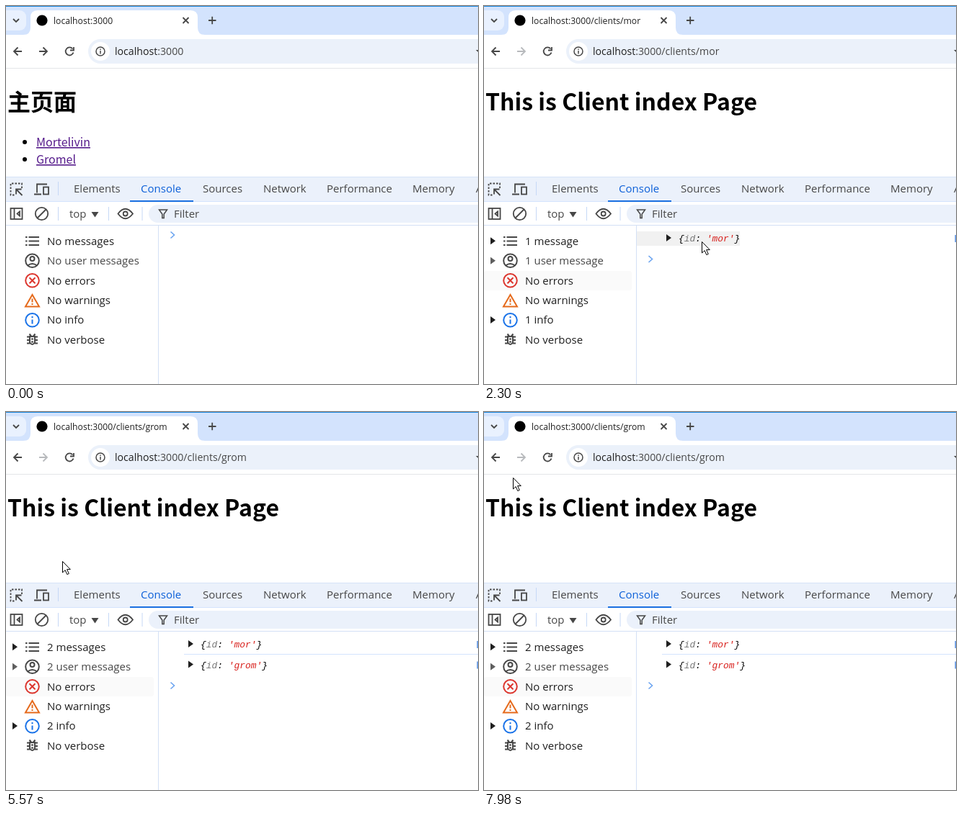
An HTML page that plays this animation: 655 px wide and 525 px high, repeating every 8 s.

```html
<!DOCTYPE html>
<html lang="zh">
<head>
<meta charset="utf-8">
<title>localhost:3000</title>
<style>
html, body { margin: 0; width: 100%; height: 100%; overflow: hidden; background: #fff; }
svg { display: block; }
text { white-space: pre; }
.ui { font: 15px "Open Sans", "Noto Sans", sans-serif; fill: #1f1f1f; }
.small { font-size: 12.2px; }
.url { font-size: 14.15px; }
.page { font: 16px "Noto Sans CJK SC", "Noto Sans CJK", "Noto Sans", sans-serif; }
.title { font-weight: 700; font-size: 32px; }
.link { fill: #551a8b; text-decoration: underline; }
.log { font: italic 12.9px "Liberation Mono", monospace; }
.soft { fill: #474747; }
.line { fill: none; stroke: #474747; stroke-width: 1.8; }
</style>
</head>
<body>
<svg width="655" height="525" viewBox="0 0 655 525">
  <!-- tab strip -->
  <rect width="655" height="40" fill="#d3e3fd"/>
  <rect width="655" height="1" fill="#1a86dc"/>
  <rect x="-10" y="6" width="38" height="28" rx="9" fill="#e9f1fe"/>
  <path class="line" d="M10 18l4 4 4-4"/>
  <path d="M24 40q10 0 10-10V16q0-10 10-10H256q10 0 10 10V30q0 10 10 10Z" fill="#fff"/>
  <circle cx="50" cy="20" r="7.6"/>
  <text id="tab" class="ui small" x="66" y="24.5"></text>
  <path class="line" stroke-width="1.5" d="M245.500 16l8 8m0-8l-8 8M281 20h10.500M286.200 14.800v10.500"/>

  <!-- address bar -->
  <path class="line" d="M22 63H11m5.500-5.500L11 63l5.500 5.500"/>
  <circle id="backHover" cx="16" cy="63" r="17" fill="#1f1f1f" opacity=".1"/>
  <path id="forward" class="line" d="M46 63h11m-5.500-5.500L57 63l-5.500 5.500"/>
  <path class="line" d="M92.500 59.500a5.500 5.500 0 1 0 1 5M94 57v4.500h-5"/>
  <rect x="114" y="46" width="580" height="34" rx="17" fill="#ebf1fa"/>
  <circle cx="131" cy="63" r="13" fill="#fff"/>
  <circle class="line" cx="131" cy="63" r="6" style="stroke-width:1.5"/>
  <path class="line" style="stroke-width:1.5" d="M131 59.500v1.500m0 1v4.500"/>
  <text class="ui url" x="151" y="68">localhost<tspan id="path" class="soft"></tspan></text>
  <path d="M652 61h8l-4 4Z" fill="#474747"/>
  <rect y="86" width="655" height="1" fill="#e3e5e8"/>

  <!-- page -->
  <g id="home" class="page">
    <text class="title" x="2" y="145">主页面</text>
    <circle cx="26" cy="189" r="3"/><circle cx="26" cy="213" r="3"/>
    <text class="link" x="42" y="195">Mortelivin</text>
    <text class="link" x="42" y="219">Gromel</text>
  </g>
  <text id="client" class="page title" x="2" y="145">This is Client index Page</text>

  <!-- developer tools -->
  <rect y="237" width="655" height="34" fill="#ebf1fb"/>
  <rect y="237" width="655" height="1" fill="#d7e3f8"/>
  <rect y="271" width="655" height="1" fill="#d3e3fd"/>
  <rect x="172" y="270" width="88" height="2" fill="#1a6fe0"/>
  <g id="tabs" class="ui"></g>
  <path class="line" stroke-dasharray="2.500 2" d="M22 253V246.500H6.500V262.500H13"/>
  <path class="line" d="M22.500 263l-8.500-8.500m0 7v-7h7.500"/>
  <path class="line" d="M57 247.500H43v12m-4 2h10"/>
  <rect class="line" x="52" y="251.500" width="7" height="10"/>
  <path d="M72.500 244v19M72.500 279v19M142.500 279v19M189 279v19" stroke="#c6d8f6"/>
  <rect class="line" x="6.500" y="281" width="16" height="15"/>
  <path class="line" d="M11.500 281v15m7.500-10.500l-3.500 3 3.500 3Z"/>
  <circle class="line" cx="49.500" cy="288.500" r="8.700"/>
  <path class="line" d="M43.500 294.500l12-12"/>
  <text class="ui soft" x="88" y="294">top</text>
  <path d="M118.500 286h10l-5 7.500Z" fill="#474747"/>
  <path class="line" d="M155.500 288.500q10-13.500 20.500 0q-10.500 13.500-20.500 0Z"/>
  <circle class="line" cx="165.700" cy="288.500" r="3"/>
  <rect x="198" y="276" width="500" height="25" rx="12.500" fill="#ebf1fb"/>
  <path class="line" style="stroke-width:1.500" d="M212.500 283h11l-4.300 6v5.500h-2.400v-5.500Z"/>
  <text class="ui soft" x="233" y="294">Filter</text>
  <path d="M0 304.500H655M211.500 305V525" stroke="#d3e0f5"/>

  <rect id="rowHover" y="368" width="205" height="27" rx="3" fill="#fafafa"/>
  <g id="side" class="ui"></g>
  <g fill="none" stroke="#474747" stroke-width="2">
    <path d="M27 321h2.500m2 0H46M27 326.500h2.500m2 0H46M27 332h2.500m2 0H46"/>
    <circle cx="36.500" cy="353.800" r="9.300"/><circle cx="36.500" cy="351" r="3"/>
    <path d="M30 360.500q6.500-5 13 0"/>
    <g stroke="#dc362e"><circle cx="36.500" cy="381.300" r="9.300"/><path d="M32.500 377.300l8 8m0-8l-8 8"/></g>
    <path stroke="#e46962" style="stroke:#e56a1c" d="M36.500 401L27 417.500H46ZM36.500 406.500v5m0 1.500v2"/>
    <g stroke="#1a73e8"><circle cx="36.500" cy="436.300" r="9.300"/><path d="M36.500 431v2.200m0 2.300v6"/></g>
    <path d="M33 459h7v8.500q-3.500 5-7 0ZM29 459.500h4m7 0h4M29 464h4m7 0h4M29 468.500h4m7 0h4M32.500 455.500l2.500 3m5.500-3l-2.500 3M35 462.500h3M35 466.500h3"/>
  </g>

  <g id="logs"></g>
  <path id="prompt" d="M228.500 313.500l5 4.500-5 4.500" fill="none" stroke="#6ba4f0" stroke-width="1.600"/>

  <g id="bubble">
    <path id="bubbleBox" fill="#d3e3fd"/>
    <text id="bubbleText" class="ui small soft" x="-1" y="16"></text>
  </g>
  <g id="cursor" fill="#fff" stroke="#000" stroke-linejoin="round">
    <path id="arrow" d="M.5.500V16l3.600-3.400 2.700 6 2.500-1.100-2.700-5.900h4.700Z"/>
    <path id="hand" d="M-2 15V2Q-2 .5-.3.500T1.500 2V8.500Q1.700 7 3.200 7T4.900 9Q5 8 6.300 8T7.600 10Q9.300 9 9.300 11.500V16Q9 19 7 20.500V23H-2V21Q-4 19-7 14.500Q-8 12.500-6.500 12T-4 13.300ZM1.500 8.500V12M4.900 9V12.500M7.600 10V13"/>
  </g>
</svg>
<script>
const $ = id => document.getElementById(id);
const show = (id, on) => { $(id).style.display = on ? '' : 'none'; };
const text = (x, y, s, cls = '') => `<text class="${cls}" x="${x}" y="${y}">${s}</text>`;
const triangle = (x, y, color) => `<path d="M${x} ${y - 5}l7 5-7 5Z" fill="${color}"/>`;

const ids = ['mor', 'grom'];
const loop = 8000;

// start time, client shown (-1 is the home page), messages logged
const states = [[0, -1, 0], [1840, 0, 1], [3800, -1, 1], [5210, 1, 2]];

// pointer: time, x, y
const route = [
  [50, 184, 499], [230, 171, 173], [1030, 171, 173], [1190, 101, 186],
  [2120, 101, 186], [2300, 302, 327], [2490, 316, 330], [2740, 316, 330],
  [3440, 38, 53], [3530, 20, 65], [3800, 20, 65], [4200, 66, 218],
  [4270, 64, 212], [5540, 64, 212], [5850, 204, 160], [6320, 59, 88],
  [6370, 55, 87], [6710, 15, 61], [7120, 15, 61], [7460, 270, 354],
  [7690, 270, 354], [7980, 40, 91]
];

// status bubble: fade start, fade end, gone, top, width, client
const bubbles = [[1370, 1450, 2150, 215, 158, 0], [4450, 4560, 5570, 231, 166, 1]];

$('tabs').innerHTML = [[94, 'Elements'], [187, 'Console'], [273, 'Sources'], [357, 'Network'],
  [445, 'Performance'], [564, 'Memory'], [652, 'Application']]
  .map(([x, s]) => `<text x="${x}" y="259" fill="${s === 'Console' ? '#0b5fd8' : '#474747'}">${s}</text>`).join('');

function drawSide(n) {
  const count = s => `${n || 'No'} ${s}${n === 1 ? '' : 's'}`;
  const labels = [count('message'), count('user message'), 'No errors', 'No warnings', `${n || 'No'} info`, 'No verbose'];
  $('side').innerHTML = labels.map((s, i) => {
    const y = 326.300 + i * 27.400;
    const mark = n && [0, 1, 4].includes(i) ? triangle(9, y, i === 1 ? '#5f5f5f' : '#1f1f1f') : '';
    return mark + text(57, y + 5.500, s, i === 1 ? 'soft' : '');
  }).join('');
}

function drawLogs(n) {
  $('logs').innerHTML = ids.slice(0, n).map((id, i) => {
    const y = 322 + i * 28.500;
    return `<rect id="log${i}" x="212" y="${y - 9}" width="${143 + i * 8}" height="20" fill="#f1f1f1"/>`
      + (i ? '<path d="M247 336.500H655" stroke="#d3e3fd"/>' : '')
      + triangle(253, y, '#1f1f1f')
      + text(270, y + 5, `{<tspan fill="#777">id</tspan>: <tspan fill="#d8201c">'${id}'</tspan>}`, 'log')
      + `<rect x="653.500" y="${y - 4}" width="1.500" height="10" fill="#5c93e6"/>`;
  }).join('');
  $('prompt').setAttribute('transform', `translate(0 ${n ? 5 + n * 28.500 : 0})`);
}

function pointer(t) {
  const i = route.findIndex(p => p[0] > t);
  if (i < 0) return route.at(-1).slice(1);
  if (i === 0) return route[0].slice(1);
  const [a, b] = [route[i - 1], route[i]];
  const k = (t - a[0]) / (b[0] - a[0]);
  return [a[1] + (b[1] - a[1]) * k, a[2] + (b[2] - a[2]) * k];
}

let current;
function setState(state) {
  if (state === current) return;
  current = state;
  const [, client, n] = state;
  const path = ':3000' + (client < 0 ? '' : '/clients/' + ids[client]);
  $('tab').textContent = 'localhost' + path;
  $('path').textContent = path;
  show('home', client < 0);
  show('client', client >= 0);
  $('forward').style.stroke = client < 0 ? '#474747' : '#b8babd';
  drawSide(n);
  drawLogs(n);
}

function frame() {
  const t = performance.now() % loop;
  setState(states.findLast(s => s[0] <= t));

  const [x, y] = pointer(t);
  const onLink = t >= 1170 && t < 2120 || t >= 4200 && t < 5540;
  show('cursor', t >= 50);
  show('arrow', !onLink);
  show('hand', onLink);
  $('cursor').setAttribute('transform', `translate(${Math.round(x)} ${Math.round(y)})`);

  show('backHover', t >= 3620 && t < 3850);
  show('rowHover', t >= 120);
  for (let i = 0; i < current[2]; i++)
    show('log' + i, x > 212 && Math.abs(y - 323 - i * 28.500) < 13);

  const b = bubbles.find(b => t >= b[0] && t < b[2]);
  show('bubble', b);
  if (b) {
    const [from, to, , top, w, client] = b;
    $('bubble').setAttribute('transform', `translate(0 ${top})`);
    $('bubble').setAttribute('opacity', Math.min(1, .3 + .7 * (t - from) / (to - from)));
    $('bubbleBox').setAttribute('d', `M0 0H${w - 4}q4 0 4 4V${client ? 18 : 22}${client ? 'q0 4-4 4' : ''}H0Z`);
    $('bubbleText').textContent = 'localhost:3000/clients/' + ids[client];
  }
  requestAnimationFrame(frame);
}
frame();
</script>
</body>
</html>
```
